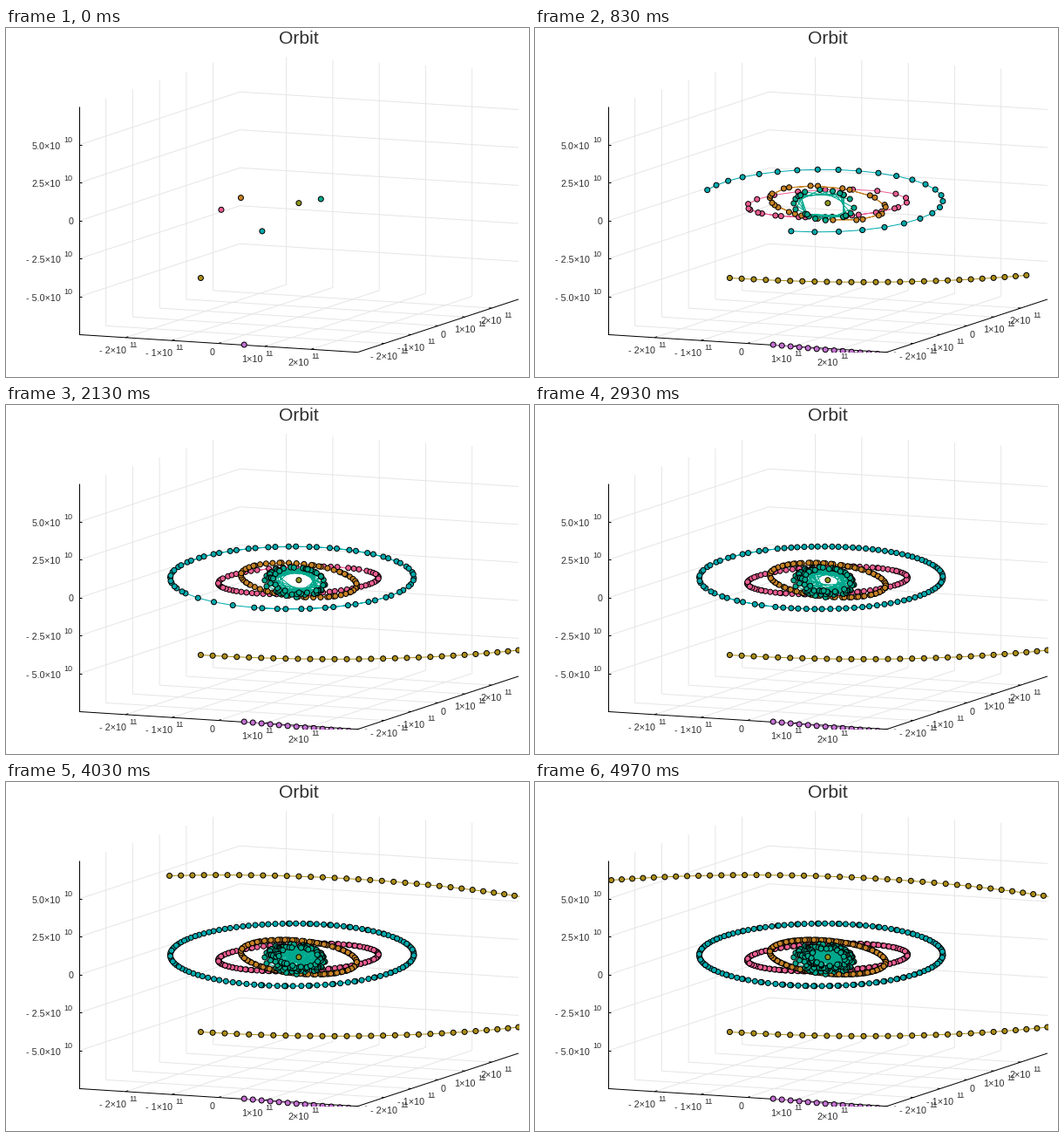
A matplotlib script for the animation above (5010 ms loop, 600 by 400 pixels).

```python
import numpy as np
import matplotlib.pyplot as plt
from matplotlib.animation import FuncAnimation
from matplotlib.collections import LineCollection
from matplotlib.patches import Rectangle

W, H, DPI = 600, 400, 100
PX = 72 / DPI
LOOP, TICK = 5010, 30
STEPS = 150
STEP_MS = 100 / 3
DAYS = 20            # simulated days per step
AU = 1.496           # in 1e11 m
INK = "#303030"

plt.rcParams["font.family"] = "Liberation Sans"


def project(x, y, z):
    """Oblique view; x, y, z in 1e11 m, result in pixels."""
    sx = 335.9 + 53.25 * x + 30.75 * y
    sy = 200.7 + 3.37 * x - 10.12 * y - 174 * z
    return sx, sy


def orbit(a, lon, e=0, peri=0, inc=0, node=0, shrink=0):
    """Kepler ellipse in AU and degrees; a shrinking one keeps its perihelion."""
    scale = 1 - shrink * np.arange(STEPS)
    motion = 0.9856 * DAYS * (a * scale) ** -1.5
    mean = np.radians(lon - peri + np.cumsum(motion) - motion[0])
    e = np.maximum(0, 1 - (1 - e) / scale)
    E = mean + e * np.sin(mean)
    for _ in range(8):
        E -= (E - e * np.sin(E) - mean) / (1 - e * np.cos(E))
    nu = np.arctan2(np.sqrt(1 - e ** 2) * np.sin(E), np.cos(E) - e)
    r = a * AU * scale * (1 - e * np.cos(E))
    inc, node = np.radians([inc, node])
    u = nu + np.radians(peri) - node
    flat = np.sin(u) * np.cos(inc)
    x = r * (np.cos(node) * np.cos(u) - np.sin(node) * flat)
    y = r * (np.sin(node) * np.cos(u) + np.cos(node) * flat)
    return project(x, y, r * np.sin(u) * np.sin(inc))


fig = plt.figure(figsize=(W / DPI, H / DPI), dpi=DPI, facecolor="white")
ax = fig.add_axes([0, 0, 1, 1])
ax.set_xlim(0, W)
ax.set_ylim(H, 0)
ax.axis("off")


def strokes(segments, color, order, snap=None):
    lines = LineCollection(segments, colors=color, linewidths=PX, zorder=order)
    lines.set_snap(snap)
    ax.add_collection(lines, autolim=False)


def seg(p, q):
    return [project(*p), project(*q)]


def label(x, y, base, power=None, ha="center"):
    """Tick label centred vertically on y, with an optional raised power."""
    text = ax.text(x, y + 3.8, base, size=10.7 * PX, color=INK, ha=ha,
                   va="baseline")
    if power:
        ax.annotate(power, xy=(1, 0), xycoords=text, xytext=(3, 7.3),
                    textcoords="offset pixels", size=9 * PX, color=INK,
                    ha="left", va="bottom")


def mantissa(v, fmt):
    return ("- " if v < 0 else "") + fmt.format(abs(v)) + "×10"


R, Z = 3, 0.75
grid, axis_lines = [], [
    seg((-R, -R, -Z), (-R, -R, Z)),
    seg((-R, -R, -Z), (R, -R, -Z)),
    seg((R, -R, -Z), (R, R, -Z)),
]

for v in range(-2, 3):
    grid += [seg((v, -R, -Z), (v, R, -Z)), seg((v, R, -Z), (v, R, Z)),
             seg((-R, v, -Z), (R, v, -Z)), seg((-R, v, -Z), (-R, v, Z))]
    axis_lines += [seg((v, -R, -Z), (v, -R + 0.1, -Z)),
                   seg((R, v, -Z), (R - 0.06, v, -Z))]
    h = v / 4
    grid += [seg((-R, -R, h), (-R, R, h)), seg((-R, R, h), (R, R, h))]

    xt, xy = project(v, -R, -Z)
    yt, yy = project(R, v, -Z)
    zt, zy = project(-R, -R, h)
    axis_lines.append([(zt, zy), (zt + 3, zy)])
    if v:
        text = mantissa(v, "{}")
        label(xt - 14.5, xy + 14.5, text, "11")
        label(yt - 0.5, yy + 14.5, text, "11")
        label(63, zy + 1, mantissa(v * 2.5, "{:.1f}"), "10", "right")
    else:
        label(xt - 7, xy + 10, "0")
        label(yt + 6, yy + 10, "0")
        label(77, zy, "0", ha="right")

strokes(grid, "#e6e6e6", 1, snap=False)
strokes(axis_lines, "black", 2)
ax.text(335.5, 18.5, "Orbit", size=21.2 * PX, color=INK, ha="center",
        va="baseline")

frame_box = Rectangle((84, 30), 505, 342, transform=ax.transData)


class Trail:
    """A body's path so far, with a dot at every step."""
    order = 3

    def __init__(self, color, xy):
        self.xy = np.column_stack(xy)
        self.line, = ax.plot([], [], color=color, lw=PX, zorder=Trail.order)
        self.dots = ax.scatter([], [], s=(6 * PX) ** 2, color=color,
                               edgecolor="black", zorder=Trail.order + 0.5)
        # Two equal widths keep the dots off the whole-pixel marker path.
        self.dots.set_linewidth([PX, PX])
        for artist in (self.line, self.dots):
            artist.set_clip_path(frame_box)
        Trail.order += 1

    def show(self, count):
        self.line.set_data(*self.xy[:count].T)
        self.dots.set_offsets(self.xy[:count])


trails = [
    Trail("#C371D2", orbit(10, 296.1, inc=2.5, node=114)),
    Trail("#AC8E18", orbit(5.203, 291.9, e=0.0484, peri=14.8, inc=1.3, node=100.5)),
    Trail("#00AAAE", orbit(1.5237, 289.8, e=0.0934, peri=336.1, inc=1.85, node=49.5)),
    Trail("#ED5E93", orbit(1, 225, e=0.0167, peri=103)),
    Trail("#C68225", orbit(0.7233, 209, inc=3.4, node=76.6)),
    Trail("#00A98D", orbit(0.3871, 64.5, e=0.2056, peri=77.5, inc=7, node=48.3,
                           shrink=0.0032)),
    Trail("#8E971E", [[c] for c in project(0, 0, 0)]),
]


def update(i):
    step = min(int((i * TICK + 25) / STEP_MS), STEPS - 1)
    for trail in trails:
        trail.show(step + 1)


anim = FuncAnimation(fig, update, frames=LOOP // TICK, interval=TICK,
                     init_func=lambda: update(0), repeat=True,
                     repeat_delay=0, blit=False)
plt.show()
```
